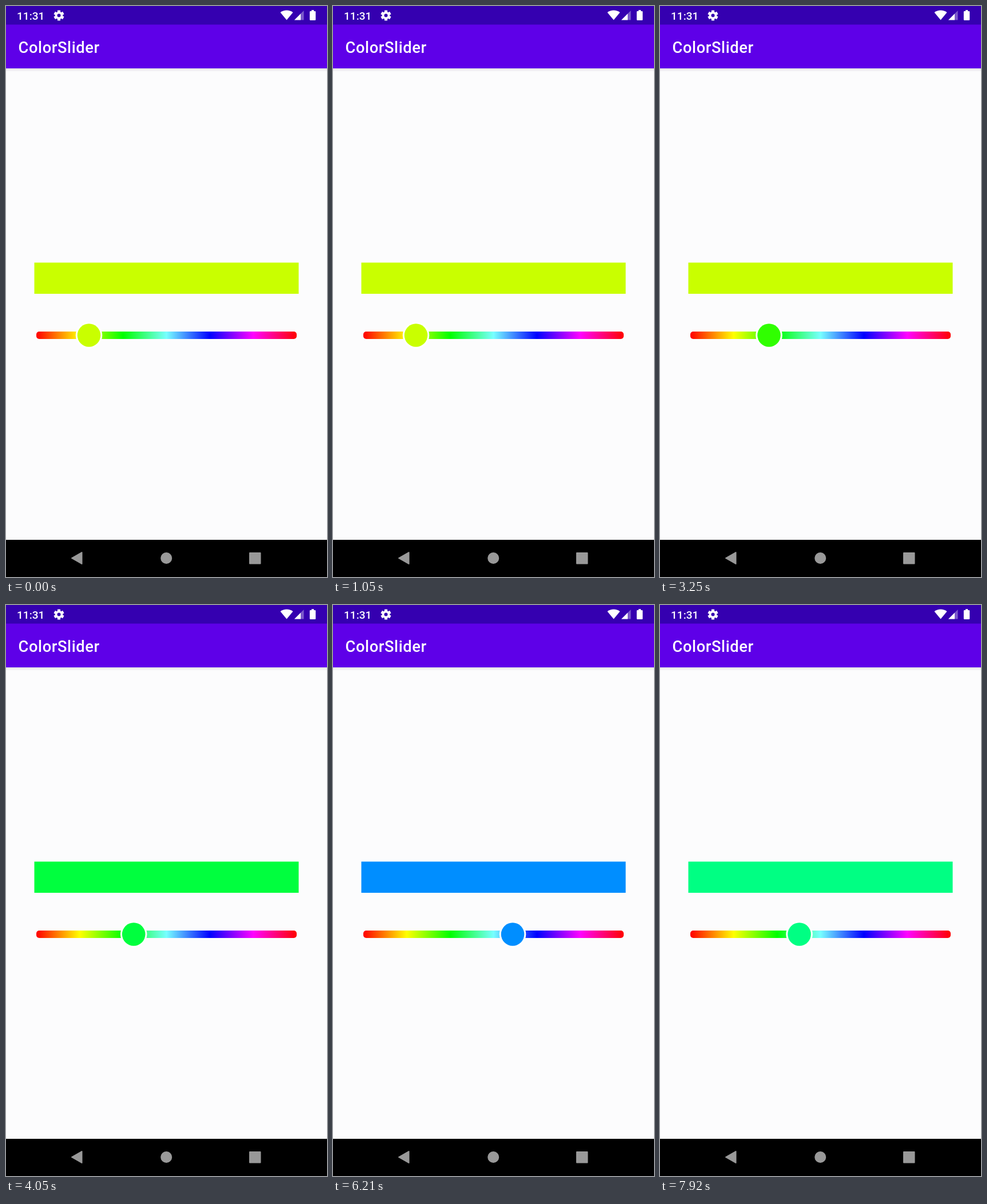
Recreate the animation shown at these times as an HTML page. Size 561 by 998 pixels, loop 8 s.

```html
<!DOCTYPE html>
<html lang="en">
<head>
<meta charset="utf-8">
<title>ColorSlider</title>
<style>
html, body { margin: 0; width: 100%; height: 100%; overflow: hidden; background: #fcfcfd; }
svg { display: block; width: 561px; height: 998px; }
text { font-family: Roboto, sans-serif; font-weight: 500; fill: #fff; }
.title { font-size: 27.3px; letter-spacing: .6px; }
.clock { font-size: 19.1px; }
</style>
</head>
<body>
<svg viewBox="0 0 561 998">
  <defs>
    <linearGradient id="hues">
      <stop offset="0" stop-color="#f00"/>
      <stop offset=".1667" stop-color="#ff0"/>
      <stop offset=".3333" stop-color="#0f0"/>
      <stop offset=".5" stop-color="#7ff"/>
      <stop offset=".6667" stop-color="#00f"/>
      <stop offset=".8333" stop-color="#f0f"/>
      <stop offset="1" stop-color="#f00"/>
    </linearGradient>
    <linearGradient id="shade" x2="0" y2="1">
      <stop offset="0" stop-color="#000" stop-opacity=".1"/>
      <stop offset="1" stop-color="#000" stop-opacity="0"/>
    </linearGradient>
  </defs>

  <rect width="561" height="998" fill="#fcfcfd"/>
  <rect y="109" width="561" height="6" fill="url(#shade)"/>
  <rect y="32" width="561" height="77" fill="#5e00e8"/>
  <rect width="561" height="32.5" fill="#3500b0"/>

  <text class="clock" x="19" y="24">11:31</text>
  <g transform="translate(92.5 16.5)">
    <g stroke="#fff" stroke-width="5">
      <path id="tooth" d="M0-9V9"/>
      <use href="#tooth" transform="rotate(60)"/>
      <use href="#tooth" transform="rotate(120)"/>
    </g>
    <circle r="6.7" fill="#fff"/>
    <circle r="3" fill="#3500b0"/>
  </g>
  <g fill="#fff">
    <path d="M490.5 24.5L479.5 11.2Q484.3 7.5 490.5 7.5T501.500 11.200Z"/>
    <path d="M504 24.500L520.500 8V24.500Z" opacity=".35"/>
    <path d="M504 24.500L515 13.500V24.500Z"/>
    <path d="M534 7h4v2h2a1.200 1.200 0 0 1 1.200 1.200v13.600a1.200 1.200 0 0 1-1.200 1.200h-8a1.200 1.200 0 0 1-1.200-1.200V10.200a1.200 1.200 0 0 1 1.200-1.200h2z"/>
  </g>
  <text class="title" x="21.500" y="81.500">ColorSlider</text>

  <rect id="swatch" x="49.500" y="448.500" width="462" height="54.500"/>
  <rect x="53" y="569" width="455" height="13" rx="5" fill="url(#hues)"/>
  <g id="thumb">
    <circle r="23.300" fill="#fff"/>
    <circle id="dot" r="20.300"/>
  </g>

  <rect y="933" width="561" height="65"/>
  <g fill="#999" stroke="#999" stroke-width="2" stroke-linejoin="round">
    <path d="M115 965L132.500 955V975Z"/>
    <circle cx="280.200" cy="965" r="9"/>
    <rect x="426" y="956" width="18.500" height="18.500"/>
  </g>
</svg>
<script>
const LOOP = 8000, LEFT = 53, WIDTH = 455;
const RELEASE = 3300; // the swatch starts to follow the thumb here
const $ = id => document.getElementById(id);
const swatch = $('swatch'), thumb = $('thumb'), dot = $('dot');

const linear = p => p;
const easeIn = p => p ** 1.5;
const smooth = p => p * p * (3 - 2 * p);

// time, thumb centre, easing towards that point
const drag = [
  [0, 145, linear],
  [2500, 145, linear],
  [3250, 190.5, easeIn],
  [5050, 264, linear],
  [6210, 314, linear],
  [6340, 314, linear],
  [7920, 243.5, smooth],
  [LOOP, 243.5, linear]
];

function thumbX(t) {
  const i = drag.findIndex(k => k[0] > t);
  const [t0, x0] = drag[i - 1], [t1, x1, ease] = drag[i];
  return x0 + (x1 - x0) * ease((t - t0) / (t1 - t0));
}

const hue = x => `hsl(${(x - LEFT) / WIDTH * 360}, 100%, 50%)`;

function draw(now) {
  const t = Math.max(0, now) % LOOP;
  const x = thumbX(t);
  thumb.setAttribute('transform', `translate(${x} 575.5)`);
  dot.setAttribute('fill', hue(x));
  swatch.setAttribute('fill', hue(t < RELEASE ? drag[0][1] : x));
}

let start;
function tick(now) {
  start ??= now;
  draw(now - start);
  requestAnimationFrame(tick);
}
draw(0);
requestAnimationFrame(tick);
</script>
</body>
</html>
```
